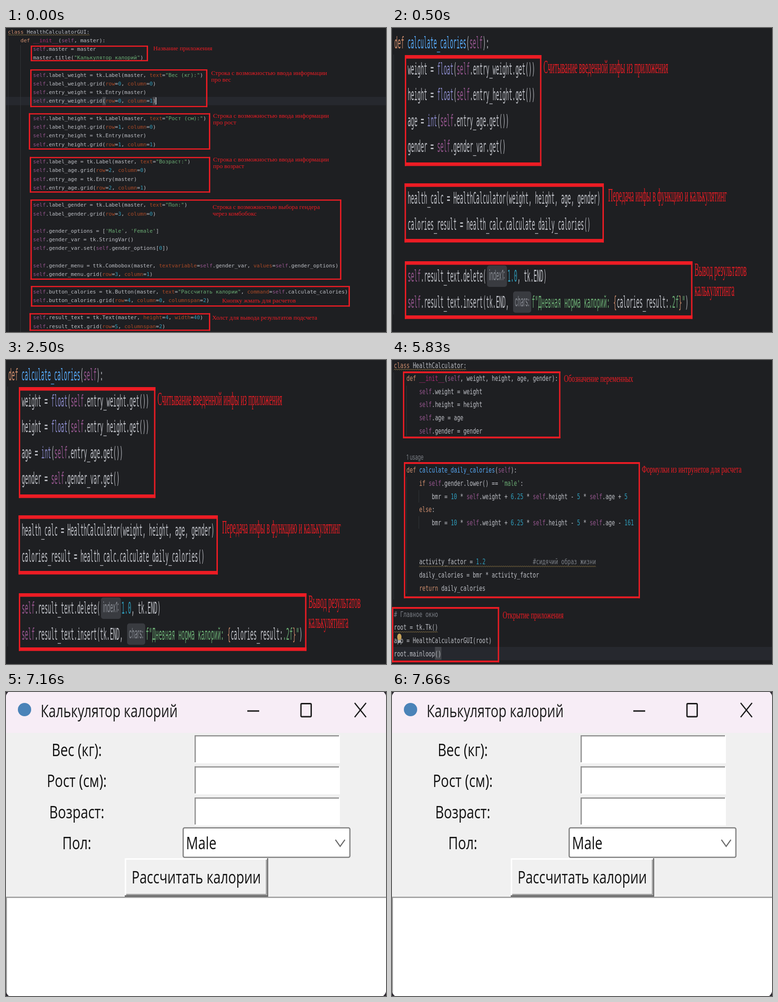
These frames come from a looping animation (800x640 px, 8 s). An HTML page with a canvas:

```html
<!DOCTYPE html>
<html lang="ru">
<head>
<meta charset="utf-8">
<title>Калькулятор калорий</title>
<style>
html, body { margin: 0; width: 100%; height: 100%; overflow: hidden; background: #1e1f22; }
canvas { display: block; width: 800px; height: 640px; }
</style>
</head>
<body>
<canvas id="stage" width="800" height="640"></canvas>
<script>
const ctx = document.getElementById('stage').getContext('2d');
const MONO = '11.01px "DejaVu Sans Mono", monospace';
const SERIF = '13.2px "Liberation Serif", serif';
const HINT = '10px Inter, sans-serif';
const ADVANCE = 6.628;
const RED = '#ed1c24';
const C = {
  back: '#1e1f22', text: '#bcbec4', comment: '#7a7e85', string: '#6aab73', self: '#94558d',
  keyword: '#cf8e6d', magic: '#b02a78', func: '#56a8f5', builtin: '#8888c6',
  kwarg: '#aa4926', number: '#2f9bb9', guide: '#313438', caret: '#26282e',
  brace: '#43454a', wave: '#857042'
};
const TOKEN = new RegExp([
  '(?<comment>#.*)', '(?<string>"[^"]*"|\'[^\']*\')', '(?<self>\\bself\\b)',
  '(?<keyword>\\b(?:def|class|if|else|return)\\b)', '(?<magic>__init__)',
  '(?<func>(?<=def )\\w+)', '(?<builtin>\\b(?:float|int)\\b)',
  '(?<kwarg>\\b\\w+(?==\\S))', '(?<number>\\b\\d+(?:\\.\\d+)?\\b)'
].join('|'), 'g');

// Each screenshot has its own horizontal and vertical scale.
let sx = 1, sy = 1;

function box(x, y, w, h, color) {
  ctx.fillStyle = color;
  ctx.fillRect(x, y, w, h);
}

function put(str, x, y, color, font, align = 'left') {
  ctx.save();
  ctx.setTransform(sx, 0, 0, sy, x, y);
  ctx.font = font;
  ctx.textAlign = align;
  ctx.fillStyle = color;
  ctx.fillText(str, 0, 0);
  ctx.restore();
}

function mono(str, x, y, color) {
  put(str, x, y, color, MONO);
  return x + str.length * ADVANCE * sx;
}

function code(line, x, y) {
  let last = 0;
  for (const m of line.matchAll(TOKEN)) {
    const kind = Object.keys(m.groups).find(k => m.groups[k] !== undefined);
    x = mono(line.slice(last, m.index), x, y, C.text);
    x = mono(m[0], x, y, C[kind]);
    last = m.index + m[0].length;
  }
  return mono(line.slice(last), x, y, C.text);
}

function listing(lines, x, y, pitch) {
  lines.forEach((line, i) => code(line, x, y + i * pitch));
}

function note(x, y, ...lines) {
  lines.forEach((s, i) => put(s, x, y + i * 14 * sy, RED, SERIF));
}

function frame(x1, y1, x2, y2) {
  const w = 2.8 * sx, h = 2.5 * sy;
  box(x1, y1, x2 - x1, h, RED);
  box(x1, y2 - h, x2 - x1, h, RED);
  box(x1, y1, w, y2 - y1, RED);
  box(x2 - w, y1, w, y2 - y1, RED);
}

function stroke(points, color, width) {
  ctx.beginPath();
  points.forEach(([x, y]) => ctx.lineTo(x, y));
  ctx.strokeStyle = color;
  ctx.lineWidth = width;
  ctx.stroke();
}

function wave(x1, x2, y) {
  const points = [];
  for (let x = x1, i = 0; x <= x2; x += 2, i++) points.push([x, y + (i % 2 ? -1 : 1) * sy * 0.8]);
  stroke(points, C.wave, 1);
}

function scale(x, y) {
  sx = x;
  sy = y;
}

function field(name, title, row) {
  return [
    `        self.label_${name} = tk.Label(master, text="${title}:")`,
    `        self.label_${name}.grid(row=${row}, column=0)`,
    `        self.entry_${name} = tk.Entry(master)`,
    `        self.entry_${name}.grid(row=${row}, column=1)`,
    ''
  ];
}

function guiClass() {
  scale(1, 1);
  box(0, 0, 800, 640, C.back);
  box(0, 145, 800, 17.5, C.caret);
  box(4, 18, 1, 622, C.guide);
  box(30, 36, 1, 604, C.guide);
  box(203, 145, 7, 17.5, C.brace);
  box(309, 145, 7, 17.5, C.brace);
  listing([
    'class HealthCalculatorGUI:',
    '    def __init__(self, master):',
    '        self.master = master',
    '        master.title("Калькулятор калорий")',
    '',
    ...field('weight', 'Вес (кг)', 0),
    ...field('height', 'Рост (см)', 1),
    ...field('age', 'Возраст', 2),
    '        self.label_gender = tk.Label(master, text="Пол:")',
    '        self.label_gender.grid(row=3, column=0)',
    '',
    "        self.gender_options = ['Male', 'Female']",
    '        self.gender_var = tk.StringVar()',
    '        self.gender_var.set(self.gender_options[0])',
    '',
    '        self.gender_menu = ttk.Combobox(master, textvariable=self.gender_var, values=self.gender_options)',
    '        self.gender_menu.grid(row=3, column=1)',
    '',
    '        self.button_calories = tk.Button(master, text="Рассчитать калории", command=self.calculate_calories)',
    '        self.button_calories.grid(row=4, column=0, columnspan=2)',
    '',
    '        self.result_text = tk.Text(master, height=4, width=40)',
    '        self.result_text.grid(row=5, columnspan=2)'
  ], 4, 11.6, 18.235);
  wave(4, 176, 14.5);
  box(315, 146, 1.5, 15, '#ced0d6');

  frame(52, 37, 299, 70);
  frame(51, 87, 424, 166.5);
  frame(48, 179.5, 430, 256);
  frame(50, 271.5, 430, 346.5);
  frame(51.5, 361, 706, 530);
  frame(52.5, 543, 724, 586.5);
  frame(49.5, 600.5, 430, 637.5);
  const input = 'Строка с возможностью ввода информации';
  note(310, 47, 'Название приложения');
  note(432, 99, input, 'про вес');
  note(436, 189, input, 'про рост');
  note(436, 281, input, 'про возраст');
  note(435, 381, 'Строка с возможностью выбора гендера', 'через комбобокс');
  note(455, 577.5, 'Кнопку жмать для расчетов');
  note(434, 613.5, 'Холст для вывода результатов подсчета');
}

function hint(str, x, y, w) {
  ctx.fillStyle = '#393b40';
  ctx.beginPath();
  ctx.roundRect(x, y - 31, w, 45, 5);
  ctx.fill();
  put(str, x + w / 2, y, '#868a91', HINT, 'center');
}

function calculateMethod() {
  scale(1.038, 2.99);
  box(0, 0, 800, 640, C.back);
  box(3, 56, 1, 547, C.guide);
  const x = 33, y = 43, pitch = 54.55;
  code('def calculate_calories(self):', 5, y);
  listing([
    'weight = float(self.entry_weight.get())',
    'height = float(self.entry_height.get())',
    'age = int(self.entry_age.get())',
    'gender = self.gender_var.get()',
    '',
    'health_calc = HealthCalculator(weight, height, age, gender)',
    'calories_result = health_calc.calculate_daily_calories()',
    '',
    'self.result_text.delete(',
    'self.result_text.insert(tk.END, '
  ], x, y + pitch, pitch);

  const y9 = y + 9 * pitch, y10 = y + 10 * pitch;
  hint('index1:', 200, y9 - 3, 42);
  code('1.0, tk.END)', 243, y9);
  hint('chars:', 255, y10 - 3, 38);
  let end = 294;
  for (const [str, color] of [
    ['f"Дневная норма калорий: ', C.string], ['{', C.keyword], ['calories_result:', C.text],
    ['.2f', C.string], ['}', C.keyword], ['"', C.string], [')', C.text]
  ]) end = mono(str, end, y10, color);

  frame(27, 57, 314.5, 290.5);
  frame(26.5, 327, 446, 451.5);
  frame(27, 491, 632.5, 612.5);
  note(319, 95, 'Считывание введенной инфы из приложения');
  note(455, 365, 'Передача инфы в функцию и калькулятинг');
  note(637, 522, 'Вывод результатов', 'калькулятинга');
}

function bulb(x, y) {
  ctx.fillStyle = '#c9a35a';
  ctx.beginPath();
  ctx.ellipse(x, y, 4.5, 7, 0, 0, Math.PI * 2);
  ctx.fill();
  box(x - 2.5, y + 7, 5, 5, '#a9abb0');
}

function calculatorClass() {
  scale(1.003, 1.513);
  box(0, 0, 800, 640, C.back);
  box(0, 604, 800, 28, C.caret);
  box(3, 26, 1, 478, C.guide);
  box(30, 54, 1, 106, C.guide);
  box(30, 246, 1, 246, C.guide);
  box(56, 274, 1, 26, C.guide);
  box(56, 329, 1, 26, C.guide);
  box(90.5, 604, 13.5, 27, C.brace);
  const y = 16.6, pitch = 27.59;
  listing([
    'class HealthCalculator:',
    '    def __init__(self, weight, height, age, gender):',
    '        self.weight = weight',
    '        self.height = height',
    '        self.age = age',
    '        self.gender = gender',
    '', '',
    '    def calculate_daily_calories(self):',
    "        if self.gender.lower() == 'male':",
    '            bmr = 10 * self.weight + 6.25 * self.height - 5 * self.age + 5',
    '        else:',
    '            bmr = 10 * self.weight + 6.25 * self.height - 5 * self.age - 161',
    '', '',
    '        activity_factor = 1.2' + ' '.repeat(15) + '#сидячий образ жизни',
    '        daily_calories = bmr * activity_factor',
    '        return daily_calories',
    '',
    '# Главное окно',
    'root = tk.Tk()',
    'app = HealthCalculatorGUI(root)',
    'root.mainloop()'
  ], 4, y, pitch);
  put('1 usage', 30.5, 209.5, C.comment, HINT);
  wave(4, 157, 20);
  wave(57, 430, 434.5);
  wave(4, 97, 572.5);
  bulb(15.5, 583);

  frame(23, 24, 354.5, 165);
  frame(25, 215, 522, 501.5);
  frame(0, 520, 225.5, 636.5);
  note(362, 46, 'Обозначение переменных');
  note(526, 236.5, 'Формулки из интрунетов для расчета');
  note(233, 544, 'Открытие приложения');
}

function entry(y) {
  box(397, y, 306, 59, '#ffffff');
  box(397, y, 304, 2.5, '#8f8f8f');
  box(397, y, 2.5, 57, '#8f8f8f');
}

function appWindow() {
  scale(1, 1.3);
  const ui = size => `${size}px "Open Sans", "Noto Sans", sans-serif`;
  box(0, 0, 800, 640, '#2c2730');
  ctx.save();
  ctx.beginPath();
  ctx.roundRect(0, -3, 800, 645, 14);
  ctx.clip();
  box(0, 0, 800, 640, '#f0f0f0');
  box(0, 0, 800, 86, '#f7edf6');

  ctx.fillStyle = '#4a83b8';
  ctx.beginPath();
  ctx.arc(39, 37, 14, 0, Math.PI * 2);
  ctx.fill();
  put('Калькулятор калорий', 73, 53, '#1a1a1a', ui(27.4));
  box(508, 38.5, 25, 3, '#1a1a1a');
  ctx.strokeStyle = '#1a1a1a';
  ctx.lineWidth = 2.8;
  ctx.beginPath();
  ctx.roundRect(621, 24.5, 21.5, 27.5, 2);
  ctx.stroke();
  stroke([[734, 23], [758, 53]], '#1a1a1a', 2.6);
  stroke([[758, 23], [734, 53]], '#1a1a1a', 2.6);

  ['Вес (кг):', 'Рост (см):', 'Возраст:', 'Пол:'].forEach((s, i) => {
    put(s, 149, 135 + i * 65.4, '#111111', ui(28.2), 'center');
    if (i < 3) entry(91 + i * 65.5);
  });

  ctx.fillStyle = '#ffffff';
  ctx.strokeStyle = '#808080';
  ctx.lineWidth = 2.5;
  ctx.beginPath();
  ctx.roundRect(373, 286, 351, 62, 3);
  ctx.fill();
  ctx.stroke();
  put('Male', 379, 331, '#111111', ui(28.2));
  stroke([[693.5, 311], [703.5, 325], [713.5, 311]], '#6a6a6a', 2.2);

  box(250, 350, 302, 81, '#696969');
  box(250, 350, 299.5, 78, '#ffffff');
  box(253, 353, 296.5, 75, '#a0a0a0');
  box(253, 353, 294, 72, '#f0f0f0');
  put('Рассчитать калории', 400.5, 403, '#111111', ui(27.7), 'center');

  box(0, 431, 800, 209, '#ffffff');
  box(0, 431, 800, 2.5, '#9a9a9a');
  box(0, 431, 2, 209, '#9a9a9a');
  ctx.restore();
}

const LOOP = 8000;
const scenes = [[0, guiClass], [500, calculateMethod], [3830, calculatorClass], [7160, appWindow]];
let shown = null;

function tick() {
  const t = performance.now() % LOOP;
  const draw = scenes.filter(([start]) => t >= start).pop()[1];
  if (draw !== shown) {
    draw();
    shown = draw;
  }
  requestAnimationFrame(tick);
}
tick();
</script>
</body>
</html>
```
